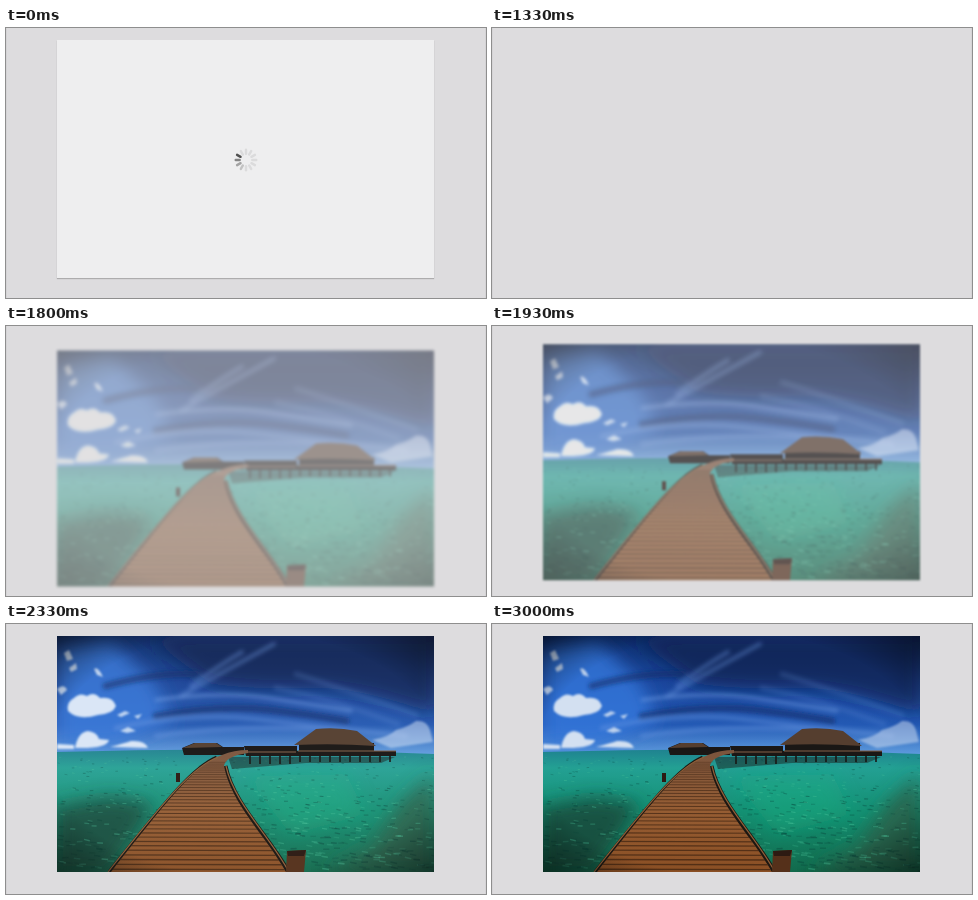
An HTML page for the animation above (3070 ms loop, 480 px wide and 270 px high).

```html
<!DOCTYPE html>
<html lang="en">
<head>
<meta charset="utf-8">
<title>Image loading</title>
<style>
html, body { margin: 0; width: 100%; height: 100%; overflow: hidden; background: #dddcde; }
body { position: relative; box-shadow: inset 1px 0 #d5d4d6, inset -1px 0 #d5d4d6; }
#card, #photo { position: absolute; left: 51px; top: 12px; width: 377px; }
#card { height: 237.5px; background: #eeeeef; box-shadow: 0 1px 1px rgba(0,0,0,.22); }
#card svg { position: absolute; left: 172.5px; top: 103.5px; width: 32px; height: 32px; }
#photo { height: 236px; overflow: hidden; }
</style>
</head>
<body>
<div id="card"><svg id="spinner" viewBox="-16 -16 32 32" stroke-width="2.4" stroke-linecap="round"></svg></div>

<svg id="photo" viewBox="51 12 377 236">
  <defs>
    <linearGradient id="sky" x2="0" y2="1">
      <stop offset="0" stop-color="#0e2d6c"/>
      <stop offset=".4" stop-color="#1a469c"/>
      <stop offset=".75" stop-color="#2359b4"/>
      <stop offset="1" stop-color="#5d9add"/>
    </linearGradient>
    <linearGradient id="sea" x2="0" y2="1">
      <stop offset="0" stop-color="#1f8290"/>
      <stop offset=".15" stop-color="#23a093"/>
      <stop offset=".5" stop-color="#149073"/>
      <stop offset="1" stop-color="#126a4c"/>
    </linearGradient>
    <linearGradient id="wood" x2="0" y2="1">
      <stop offset="0" stop-color="#7a543d"/>
      <stop offset=".5" stop-color="#965d33"/>
      <stop offset="1" stop-color="#8a4f24"/>
    </linearGradient>
    <radialGradient id="vignette" r=".72">
      <stop offset=".72" stop-opacity="0"/>
      <stop offset="1" stop-opacity=".55"/>
    </radialGradient>
    <filter id="fluff" x="-20%" y="-20%" width="140%" height="140%"><feGaussianBlur stdDeviation=".9"/></filter>
    <filter id="soft" x="-20%" y="-50%" width="140%" height="200%"><feGaussianBlur stdDeviation="2"/></filter>
    <filter id="haze" x="-50%" y="-50%" width="200%" height="200%"><feGaussianBlur stdDeviation="9"/></filter>
    <path id="walk" d="M216 131C190 140 165 172 105 248H280C260 212 225 180 218 142C219 136 226 131 242 129V126Q228 126 216 131Z"/>
    <clipPath id="onWalk"><use href="#walk"/></clipPath>
    <clipPath id="inSky"><path d="M51 12H428V130H51Z"/></clipPath>
    <clipPath id="inSea"><path id="water" d="M51 128Q235 122 428 130V248H51Z"/></clipPath>
  </defs>

  <path fill="url(#sky)" d="M51 12H428V130H51Z"/>
  <g filter="url(#haze)" clip-path="url(#inSky)">
    <path fill="#3479dc" opacity=".8" d="M51 25L105 18L150 60L165 98L110 122H51Z"/>
    <path fill="#0b1f50" opacity=".75" d="M140 12H428V90Q350 62 300 64T205 60Z"/>
  </g>
  <g filter="url(#soft)" fill="none" stroke-linecap="round">
    <path stroke="#122f6c" stroke-width="7" opacity=".6" d="M150 92Q215 80 265 86T340 97M100 62Q150 48 190 50"/>
    <g stroke="#6f9ce4">
      <path stroke-width="3" opacity=".65" d="M150 76Q215 67 262 74T345 87"/>
      <path stroke-width="4" opacity=".4" d="M175 72Q220 46 268 20M185 62Q215 40 236 28"/>
      <path stroke-width="4" opacity=".45" d="M110 104Q190 88 250 95T400 112M150 112Q240 99 340 107"/>
      <path stroke-width="5" opacity=".2" d="M290 50Q340 66 410 91M270 64Q330 76 392 100"/>
    </g>
  </g>
  <g filter="url(#fluff)" fill="#d3e0f1">
    <path d="M62 87Q60 78 68 74Q74 68 81 72Q88 67 94 74Q107 72 110 82Q107 90 92 91Q72 97 62 87Z"/>
    <path d="M69 124Q72 108 82 107Q91 108 93 115L103 116Q101 125 69 124ZM51 120L68 121V125H51ZM104 123Q119 119 125 117Q139 116 142 124Z"/>
    <path opacity=".5" d="M366 116Q383 113 390 106Q402 103 410 97Q421 96 424 106L427 118L385 124Z"/>
    <path opacity=".85" d="M58 29L63 26L67 35L61 37ZM63 44L70 39L71 45L65 48ZM88 45Q92 42 97 53L91 51ZM51 65Q58 59 61 66L55 71ZM114 107L122 103L130 107L121 109ZM111 91L119 87L124 89L115 93ZM128 92L136 90L132 95Z"/>
  </g>

  <use href="#water" fill="url(#sea)"/>
  <g filter="url(#haze)" clip-path="url(#inSea)">
    <path fill="#17463a" opacity=".8" d="M51 182L104 173L149 180L103 248H51Z"/>
    <path fill="#2f5a45" opacity=".75" d="M428 150L396 178L365 224L320 248H428Z"/>
    <path fill="#14b083" opacity=".4" d="M240 152L340 150L360 190L285 211Z"/>
  </g>
  <g id="ripples"></g>

  <g fill="#1a1715">
    <path d="M176 124L188 119H211L217 123H238V131H178ZM238 122H291V127H390V132H240Z"/>
    <path d="M293 119H368V131H293Z"/>
    <path opacity=".45" d="M222 133H389L375 139H300L226 145Z"/>
    <path id="stilts" fill="none" stroke="#1a1715" stroke-width="1.6"/>
  </g>
  <path fill="#553e2f" d="M288 121L310 105Q332 103 351 107L370 122Q330 119 288 121ZM177 124L189 119H210L216 123Z"/>
  <path fill="none" stroke="#846149" d="M240 128H290M292 127H390"/>

  <path fill="none" stroke="#1c1712" stroke-width="5" d="M211 134C189 143 163 174 104 248M219 142C227 180 262 212 282 248"/>
  <use href="#walk" fill="url(#wood)"/>
  <g id="planks" clip-path="url(#onWalk)" stroke="#2e190c" opacity=".6"></g>
  <path fill="none" stroke="#8f5f38" stroke-width="1.2" d="M212 133C188 142 162 172 102 248M220 142C228 179 263 211 283 248"/>
  <path fill="#55301a" d="M281 227L300 226L298 248H280Z"/>
  <path fill="#2d1a12" d="M281 227L300 226L298 232H282ZM170 149H174V158H170Z"/>
  <path fill="url(#vignette)" d="M51 12H428V248H51Z"/>
</svg>

<script>
const LOOP = 3070, FRAME = 1000 / 15;
const $ = id => document.getElementById(id);
const clamp = v => Math.min(1, Math.max(0, v));
const card = $('card'), photo = $('photo');

function line(parent, x1, y1, x2, y2, attrs = {}) {
  const el = document.createElementNS('http://www.w3.org/2000/svg', 'line');
  for (const [k, v] of Object.entries({ x1, y1, x2, y2, ...attrs })) el.setAttribute(k, v);
  parent.append(el);
  return el;
}

const spokes = Array.from({ length: 12 }, (_, i) =>
  line($('spinner'), 0, -6.3, 0, -10.3, { transform: `rotate(${i * 30})` }));
const greys = ['#505050', '#858585', '#a3a3a3', '#c2c2c2'];

let seed = 7;
const random = () => (seed = seed * 16807 % 2147483647) / 2147483647;
for (let i = 0; i < 700; i++) {
  const depth = random(), x = 51 + random() * 377, y = 133 + depth * 114;
  const size = 2 + depth * 5;
  line($('ripples'), x, y, x + size, y + size * .3 * (random() - .2), {
    stroke: random() < .4 ? '#4cc69c' : '#063a33',
    opacity: .15 + random() * .25,
    'stroke-width': .8 + depth * .8
  });
}

for (let y = 138, gap = 1.8; y < 250; y += gap, gap += .1)
  line($('planks'), 100, y, 285, y + .5, { 'stroke-width': gap * .27 });

let stilts = '';
for (let x = 244; x < 390; x += 10) stilts += `M${x} 130V${x < 290 ? 140 : 138}`;
$('stilts').setAttribute('d', stilts);

function draw(now) {
  const t = Math.floor((now % LOOP + 3.5) / FRAME) * FRAME;

  const head = 10 + Math.floor((t + 29) / 72);
  spokes.forEach((s, i) => s.setAttribute('stroke', greys[(head - i + 24) % 12] || '#dbdbdc'));
  card.style.opacity = 1 - clamp((t - 933) / 400);

  const enter = clamp((t - 1467) / 600);
  const tone = 1 - clamp((t - 1467) / 1000);
  photo.style.opacity = enter;
  photo.style.transform = `translateY(${28 * (1 - enter)}px)`;
  photo.style.filter = tone
    ? `saturate(${1 - .45 * tone}) brightness(${1 + .35 * tone}) contrast(${1 - .3 * tone}) blur(${4 * (1 - enter)}px)`
    : 'none';
}

function tick() {
  draw(performance.now());
  requestAnimationFrame(tick);
}
tick();
</script>
</body>
</html>
```
